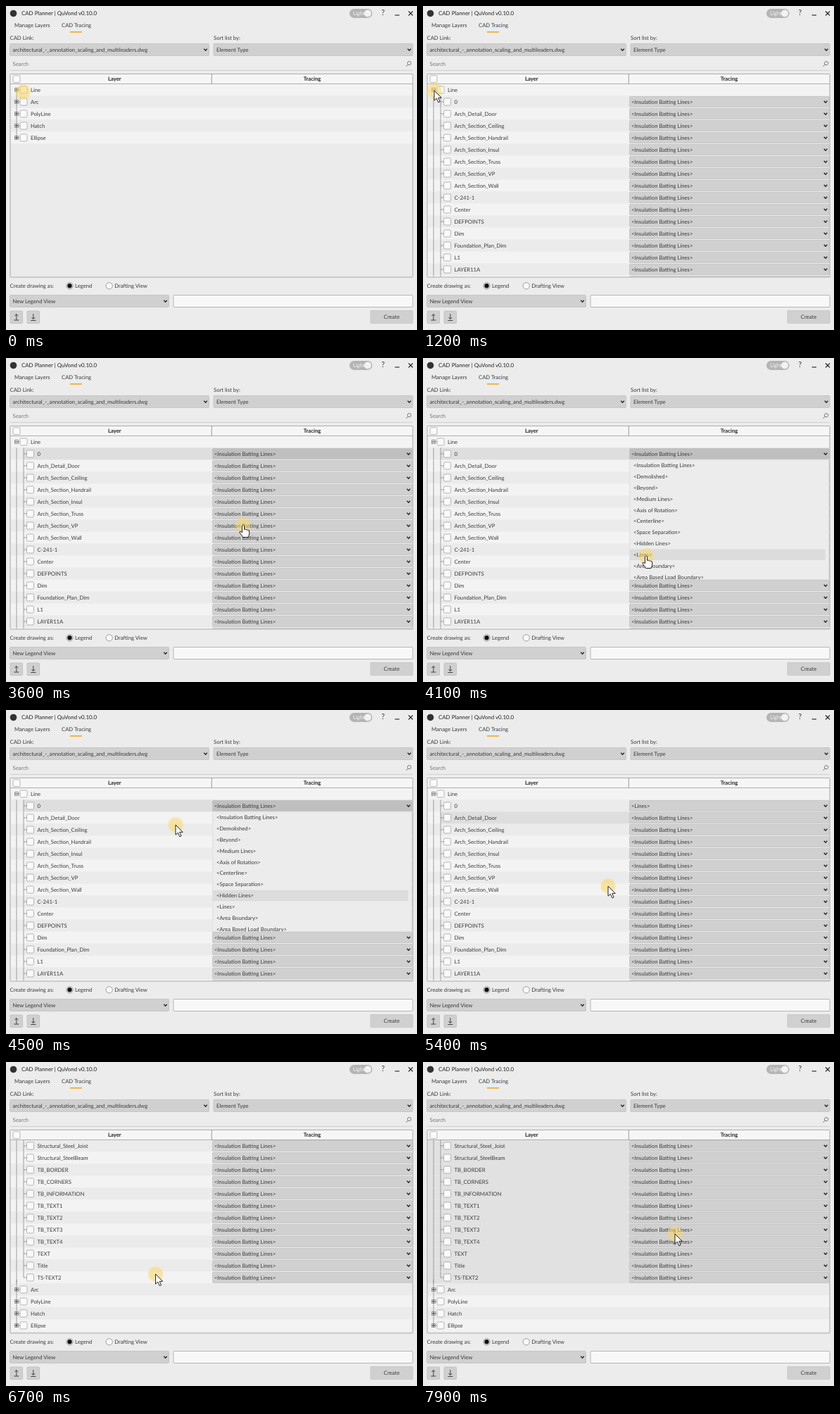
Animation of 584x460 px, one loop 8 s. Source, as an HTML page with a canvas:

```html
<!DOCTYPE html>
<html lang="en">
<head>
<meta charset="utf-8">
<title>Layer tracing</title>
<style>
  html, body { margin: 0; width: 100%; height: 100%; overflow: hidden; background: #ececec; }
  canvas { display: block; width: 584px; height: 460px; }
</style>
</head>
<body>
<canvas id="stage"></canvas>
<script>
const W = 584, H = 460, LOOP = 8000, STEP = 100;
const ROW = 17, FIRST = 119, TOP = 111, BOTTOM = 384.5;
const INK = '#3a3a3a', FIELD = '#d0d0d0', FRAME = '#a9a9a9';
const LIGHT = '#f3f3f3', DARK = '#ebebeb', HOVER = '#dedede';
const BATTING = '<Insulation Batting Lines>';

const layers = ('0 Arch_Detail_Door Arch_Section_Ceiling Arch_Section_Handrail Arch_Section_Insul ' +
  'Arch_Section_Truss Arch_Section_VP Arch_Section_Wall C-241-1 Center DEFPOINTS Dim ' +
  'Foundation_Plan_Dim L1 LAYER11A Layer_Notes Legend Lights Material Notes Outline Pattern ' +
  'Plumbing Rebar Revision Roof_Plan Section Steel Structural_Concrete Structural_Footing ' +
  'Structural_Steel_Joist Structural_SteelBeam TB_BORDER TB_CORNERS TB_INFORMATION TB_TEXT1 ' +
  'TB_TEXT2 TB_TEXT3 TB_TEXT4 TEXT Title TS-TEXT2').split(' ');
const groups = ['Line', 'Arc', 'PolyLine', 'Hatch', 'Ellipse'];
const styles = [BATTING, '<Demolished>', '<Beyond>', '<Medium Lines>', '<Axis of Rotation>',
  '<Centerline>', '<Space Separation>', '<Hidden Lines>', '<Lines>', '<Area Boundary>',
  '<Area Based Load Boundary>'];

// Event times in ms
const EXPAND = 1000, HOVER_ROW = 2500, OPEN = 3700, PICK = 4400, CLOSE = 4700,
  SCROLL = 5500, SCROLLED = 6100, HOVER_GROUP = 7800;
const SCROLL_ROWS = 31;

// Pointer path: time, x, y
const path = [
  [0, 24, 122], [500, 16, 120], [1300, 16, 120], [1600, 40, 131], [1700, 40, 131],
  [2000, 95, 152], [2300, 162, 167], [2600, 402, 139], [2700, 388, 138], [2900, 388, 138],
  [3300, 350, 180], [3600, 337, 237], [4100, 317, 281], [4300, 317, 281], [4500, 241, 163],
  [4700, 226, 156], [5400, 263, 250], [6200, 263, 250], [6700, 212.5, 301], [7100, 236, 301],
  [7400, 348, 256], [7700, 348, 256], [7900, 358, 244]
];

const canvas = document.getElementById('stage');
const dpr = window.devicePixelRatio || 1;
canvas.width = W * dpr;
canvas.height = H * dpr;
const ctx = canvas.getContext('2d');
ctx.scale(dpr, dpr);
ctx.textRendering = 'geometricPrecision';

function text(str, x, y, { size = 7.7, color = INK, weight = 400, align = 'left' } = {}) {
  ctx.font = `${weight} ${size}px Lato, "Open Sans", sans-serif`;
  ctx.fillStyle = color;
  ctx.textAlign = align;
  ctx.fillText(str, x, y + 2.7);
}

function rect(x, y, w, h, fill, stroke, r = 0) {
  ctx.beginPath();
  ctx.roundRect(x, y, w, h, r);
  if (fill) { ctx.fillStyle = fill; ctx.fill(); }
  if (stroke) { ctx.strokeStyle = stroke; ctx.lineWidth = 0.8; ctx.stroke(); }
}

function line(points, color = INK, width = 1) {
  ctx.beginPath();
  points.forEach(([x, y], i) => i ? ctx.lineTo(x, y) : ctx.moveTo(x, y));
  ctx.strokeStyle = color;
  ctx.lineWidth = width;
  ctx.stroke();
}

function circle(x, y, r, fill, stroke) {
  ctx.beginPath();
  ctx.arc(x, y, r, 0, Math.PI * 2);
  if (fill) { ctx.fillStyle = fill; ctx.fill(); }
  if (stroke) { ctx.strokeStyle = stroke; ctx.lineWidth = 0.8; ctx.stroke(); }
}

function chevron(x, y) {
  line([[x - 2.3, y - 1.2], [x, y + 1.3], [x + 2.3, y - 1.2]], '#222', 1.3);
}

function select(x, y, w, h, label, fill = FIELD, pad = 4) {
  rect(x, y, w, h, fill, '#c2c2c2', 1);
  text(label, x + pad, y + h / 2);
  chevron(x + w - 5, y + h / 2);
}

function checkbox(x, y) {
  rect(x - 5, y - 5, 10, 10, '#fafafa', '#a4a4a4', 1.5);
}

function expander(y, open) {
  rect(12.5, y - 2.5, 5, 5, '#f4f4f4', '#777');
  line([[13, y], [17, y]], '#222', 0.9);
  if (!open) line([[15, y - 2], [15, y + 2]], '#222', 0.9);
}

function titleBar() {
  circle(10.5, 10.5, 4.8, '#333');
  text('CAD Planner | QuVond v0.10.0', 22, 10.5, { size: 7.9, color: '#222' });
  rect(488, 4, 32.5, 13, '#b4b4b4', null, 6.5);
  text('Light', 493, 10.5, { color: '#f5f5f5' });
  circle(514, 10.5, 5, '#f2f2f2');
  text('?', 535.8, 10.2, { size: 11, align: 'center' });
  line([[552.5, 13], [559, 13]], '#222', 1.1);
  line([[572, 7.5], [578, 13.5]], '#222', 1.1);
  line([[578, 7.5], [572, 13.5]], '#222', 1.1);
  text('Manage Layers', 12, 27.5);
  text('CAD Tracing', 79, 27.5);
  rect(91, 36, 17, 1.8, '#efb03c');
}

function filters() {
  text('CAD Link:', 5.5, 45.5);
  text('Sort list by:', 295, 45.5);
  select(5.5, 53.5, 283, 17, 'architectural_-_annotation_scaling_and_multileaders.dwg');
  select(295, 53.5, 283, 17, 'Element Type');
  text('Search', 9.5, 82.5, { color: '#777' });
  circle(573, 81.2, 2.6, null, '#666');
  line([[571.2, 83.2], [568.5, 86]], '#666', 0.9);
  line([[6, 91.5], [578, 91.5]], '#c9c9c9', 0.8);
}

function footer() {
  text('Create drawing as:', 5.5, 397.3);
  circle(90.5, 397.3, 4.6, '#fafafa', '#777');
  circle(90.5, 397.3, 3.2, '#111');
  text('Legend', 98, 397.3);
  circle(146.7, 397.3, 4.6, '#fafafa', '#888');
  text('Drafting View', 154.3, 397.3);
  select(5.5, 410.5, 226, 17, 'New Legend View');
  rect(238, 410.5, 340, 17, '#f8f8f8', FRAME, 1);
  rect(6, 433, 17.5, 17.5, FIELD, '#bdbdbd', 1);
  rect(30, 433, 17.5, 17.5, FIELD, '#bdbdbd', 1);
  arrowIcon(14.8, -1);
  arrowIcon(38.8, 1);
  rect(518, 432.5, 60, 18, FIELD, '#c4c4c4', 1);
  text('Create', 548, 441.5, { align: 'center' });
}

function arrowIcon(x, dir) {
  const y = 441.5, tip = y + dir * (dir > 0 ? 3 : 4), bar = y + (dir > 0 ? 5 : 4.5);
  line([[x, y - dir * 4.5], [x, tip]], '#333', 0.9);
  line([[x - 2.5, tip - dir * 2.5], [x, tip], [x + 2.5, tip - dir * 2.5]], '#333', 0.9);
  line([[x - 3.5, bar], [x + 3.5, bar]], '#333', 0.9);
}

function groupRow(name, i, y, open) {
  rect(6.5, y - 8.5, 571, ROW, i % 2 ? DARK : LIGHT);
  if (i) line([[15, y - ROW + 3], [15, y - 3]], '#8a8a8a', 0.8);
  line([[18, y], [20, y]], '#8a8a8a', 0.8);
  expander(y, open);
  checkbox(25, y);
  text(name, 35, y);
}

function layerRow(i, y, t) {
  const active = t >= HOVER_ROW && t < CLOSE ? 0 : t >= CLOSE && t <= SCROLL ? 1 : -1;
  const grouped = t >= HOVER_GROUP;
  const last = i === layers.length - 1;
  rect(6.5, y - 8.5, 571, ROW, grouped ? '#e1e1e1' : i % 2 ? LIGHT : DARK);
  if (i === active) rect(25, y - 8.5, 552.5, ROW, HOVER);
  line([[15, y - 8.5], [15, y + 8.5]], '#8a8a8a', 0.8);
  line([[25, y - 8.5], [25, last ? y : y + 8.5]], '#8a8a8a', 0.8);
  line([[25, y], [29, y]], '#8a8a8a', 0.8);
  checkbox(34.5, y);
  text(layers[i], 44.5, y);
  const picked = i === 0 && t >= CLOSE;
  const fill = i === 0 && active === 0 ? '#bfbfbf' : FIELD;
  select(293.5, y - 7.5, 283.5, 15, picked ? '<Lines>' : BATTING, fill, 2.5);
}

function tree(t) {
  const open = t >= EXPAND;
  const progress = Math.min(1, Math.max(0, (t - SCROLL) / (SCROLLED - SCROLL)));
  const shift = Math.round(progress * SCROLL_ROWS);
  ctx.save();
  ctx.beginPath();
  ctx.rect(6, TOP, 572, BOTTOM - TOP);
  ctx.clip();
  let index = -shift;
  const next = draw => {
    const y = FIRST + ROW * index++;
    if (y > TOP - ROW && y < BOTTOM + ROW) draw(y);
  };
  groups.forEach((name, g) => {
    next(y => groupRow(name, g, y, open && g === 0));
    if (open && g === 0) layers.forEach((_, i) => next(y => layerRow(i, y, t)));
  });
  ctx.restore();
}

function table(t) {
  rect(6, 96.5, 572, 288.5, '#ebebeb');
  tree(t);
  rect(6, 96.5, 572, 14, '#f6f6f6');
  line([[6, 110.5], [578, 110.5]], FRAME, 0.9);
  line([[292.3, 96.5], [292.3, 110.5]], '#8f8f8f', 0.9);
  checkbox(15, 103.7);
  text('Layer', 154.3, 103.5, { weight: 700, align: 'center', color: '#222' });
  text('Tracing', 435, 103.5, { weight: 700, align: 'center', color: '#222' });
  rect(6, 96.5, 572, 288.5, null, '#9c9c9c', 1);
}

function popup(t, pointer) {
  if (t < OPEN || t >= CLOSE) return;
  const pitch = 15.83, top = 144.7;
  const hovered = t < PICK ? Math.floor((pointer.y - top) / pitch) : 7;
  ctx.save();
  ctx.beginPath();
  ctx.rect(293, top, 284, 169.8);
  ctx.clip();
  rect(293, top, 284, 169.8, '#ececec', '#cfcfcf');
  styles.forEach((name, i) => {
    const y = top + pitch * (i + 0.5);
    if (i === hovered) rect(294, y - 7.7, 277.5, 15.4, '#dcdcdc');
    text(name, 299, y);
  });
  ctx.restore();
}

function pointerAt(t) {
  const i = path.findIndex(p => p[0] > t);
  if (i < 0) return { x: path.at(-1)[1], y: path.at(-1)[2] };
  const [t0, x0, y0] = path[i - 1], [t1, x1, y1] = path[i];
  const k = (t - t0) / (t1 - t0);
  return { x: x0 + (x1 - x0) * k, y: y0 + (y1 - y0) * k };
}

function shape(outline) {
  ctx.fillStyle = '#fff';
  ctx.strokeStyle = '#222';
  ctx.lineWidth = 1;
  ctx.lineJoin = 'round';
  const p = new Path2D(outline);
  ctx.fill(p);
  ctx.stroke(p);
}

function cursor(t, { x, y }) {
  const glow = ctx.createRadialGradient(x, y, 9, x, y, 12);
  glow.addColorStop(0, 'rgba(250,215,100,.55)');
  glow.addColorStop(1, 'rgba(250,215,100,0)');
  circle(x, y, 12, glow);
  if (t < STEP) return;
  ctx.save();
  ctx.translate(x, y);
  if (t >= HOVER_ROW && t < PICK) {
    shape('M-1.5 1Q0-1.5 1.5 1V6.5Q3 5 4.3 7Q5.8 6 6.8 7.8Q8.6 7 8.7 9V13Q8.3 15 7.2 16.5V17.5H-.5Q-1.5 15-5 11Q-5.5 8.5-3 9.5L-1.5 11Z');
  } else {
    shape('M0 0V14.2L3.3 11.2L5.8 16.8L8.1 15.8L5.7 10.4H10.2Z');
  }
  ctx.restore();
}

function draw(now) {
  const t = Math.floor((now % LOOP) / STEP) * STEP;
  const pointer = pointerAt(t);
  ctx.fillStyle = '#ececec';
  ctx.fillRect(0, 0, W, H);
  titleBar();
  filters();
  table(t);
  footer();
  popup(t, pointer);
  cursor(t, pointer);
}

function tick() {
  draw(performance.now());
  requestAnimationFrame(tick);
}
tick();
</script>
</body>
</html>
```
